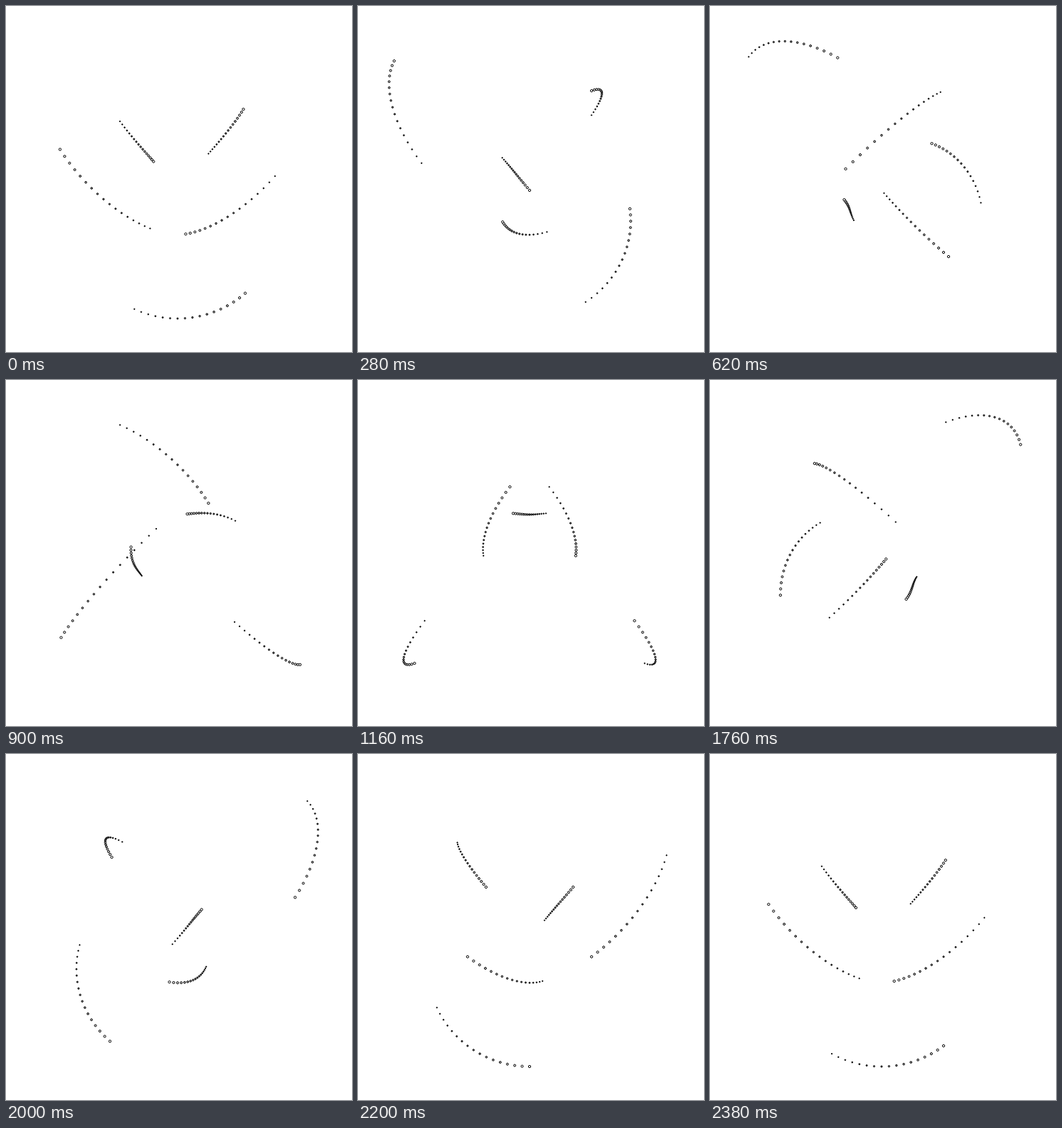
These frames come from a looping animation (486 px wide and 486 px high, 2400 ms). An HTML page with a canvas:

```html
<!DOCTYPE html>
<html lang="en">
<head>
<meta charset="utf-8">
<title>Five orbiting trails</title>
<style>
  html, body { margin: 0; width: 100%; height: 100%; overflow: hidden; background: #fff; }
  canvas { display: block; }
</style>
</head>
<body>
<canvas id="stage" width="486" height="486"></canvas>
<script>
const ctx = document.getElementById('stage').getContext('2d');
const STEP_MS = 20, STEPS = 120, TRAIL = 17, BODIES = 5;
const CENTER_X = 241, CENTER_Y = 239, RADIUS = 125;
const rad = degrees => degrees * Math.PI / 180;

// An ellipse whose size swells and shrinks once per turn; bodies are 72 degrees apart.
function position(body, step) {
  const angle = 30 + step * 360 / STEPS;
  const shift = body * 360 / BODIES;
  const reach = RADIUS * (1 + 0.6 * Math.cos(rad(angle - shift)));
  return [
    CENTER_X + reach * Math.sin(rad(angle - 2 * shift)),
    CENTER_Y + reach * Math.cos(rad(angle + shift))
  ];
}

function drawDot([x, y], age) {
  const gray = Math.round(255 * (1 - age));
  ctx.beginPath();
  ctx.arc(x, y, 1.65 - 0.95 * age, 0, 2 * Math.PI);
  ctx.fillStyle = `rgb(${gray},${gray},${gray})`;
  ctx.fill();
  ctx.stroke();
}

function draw() {
  const step = Math.floor(performance.now() / STEP_MS) % STEPS;
  ctx.fillStyle = '#fff';
  ctx.fillRect(0, 0, 486, 486);
  ctx.strokeStyle = '#000';
  ctx.lineWidth = 1;
  for (let body = 0; body < BODIES; body++) {
    for (let back = TRAIL - 1; back >= 0; back--) {
      drawDot(position(body, step - back), back / (TRAIL - 1));
    }
  }
  requestAnimationFrame(draw);
}
draw();
</script>
</body>
</html>
```
